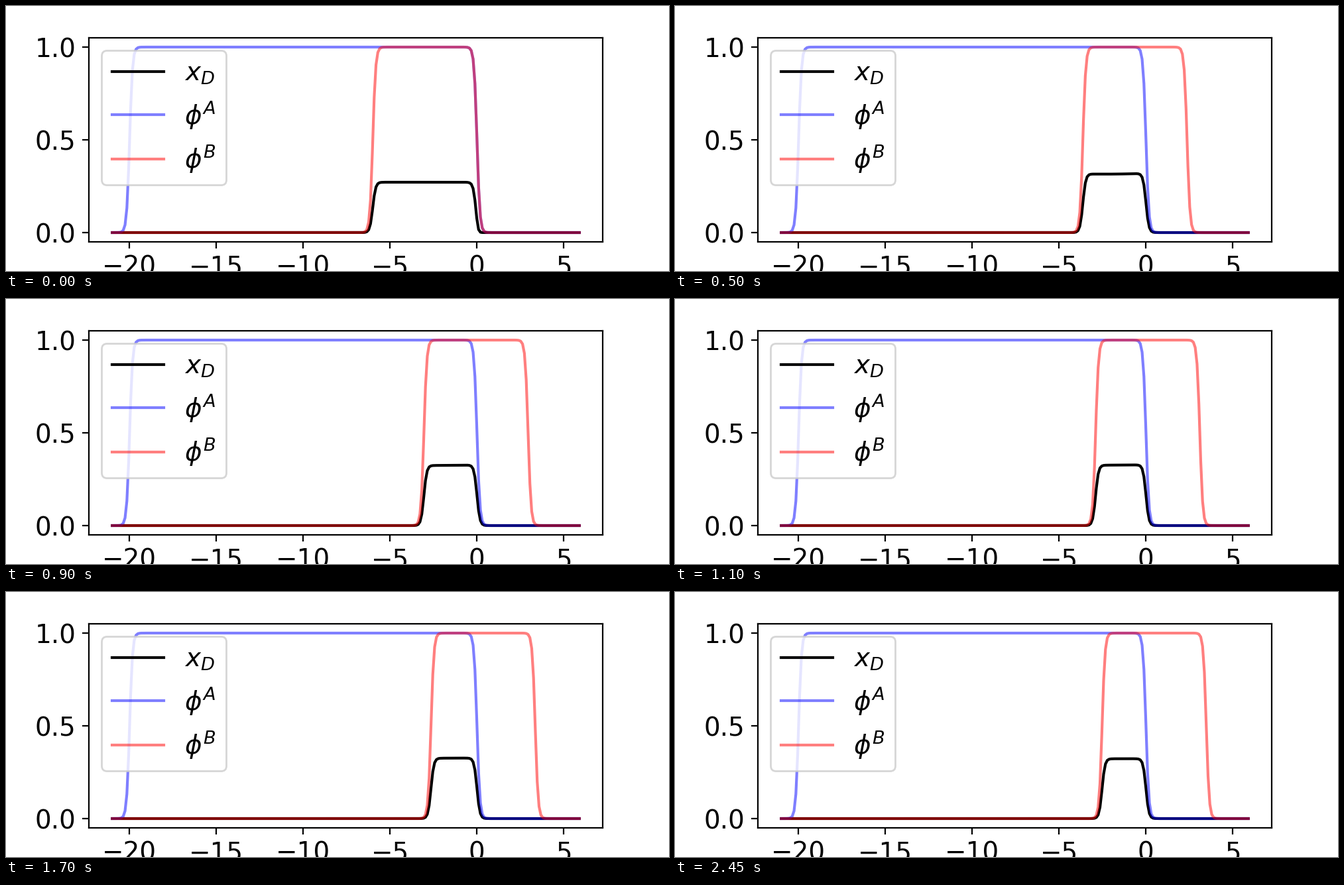
A matplotlib script for the animation above (2500 ms loop, 1000 by 400 pixels).

```python
import matplotlib.pyplot as plt
import numpy as np
from matplotlib.animation import FuncAnimation

FRAMES, INTERVAL = 50, 50
X_MIN, X_MAX, CELLS = -21, 6, 256
STEEPNESS = 6
LENGTH_A, LENGTH_B = 20, 6

plt.rcParams.update({"font.family": "DejaVu Sans", "font.size": 14})

x = np.linspace(X_MIN, X_MAX, CELLS, endpoint=False)


def filament(left, right):
    """Smooth indicator of the interval from left to right."""
    return 0.5 * (np.tanh(STEEPNESS * (x - left)) - np.tanh(STEEPNESS * (x - right)))


def shift(n):
    """Distance filament B has slid: a fast and a slow relaxation."""
    return 1.87 * (1 - np.exp(-0.068 * n)) + 1.67 * (1 - np.exp(-0.2 * n))


def density(n, left):
    """Crosslinker level across the overlap, with a passing tilt and dip."""
    u = np.clip(1 - 2 * x / left, -1, 1)
    level = 0.335 - 0.00025 * n - 0.0635 * np.exp(-0.137 * n)
    tilt = 0.00045 * n * np.exp(-n / 10)
    dip = 0.0008 * n**2 * np.exp(-n / 3)
    return level + tilt * u + dip * (u**2 - 1 / 3)


phi_a = filament(-LENGTH_A, 0)


def profiles(n):
    left = shift(n) - LENGTH_B
    phi_b = filament(left, left + LENGTH_B)
    return density(n, left) * phi_a * phi_b, phi_b


fig, ax = plt.subplots(figsize=(5, 2), dpi=200)
x_d, phi_b = profiles(0)
line_d, = ax.plot(x, x_d, color="black", label=r"$x_D$")
ax.plot(x, phi_a, color="blue", alpha=0.5, label=r"$\phi^A$")
line_b, = ax.plot(x, phi_b, color="red", alpha=0.5, label=r"$\phi^B$")

margin = 0.05 * (x[-1] - x[0])
ax.set_xlim(x[0] - margin, x[-1] + margin)
ax.set_ylim(-0.05, 1.05)
ax.set_xticks(range(-20, 6, 5))
ax.set_yticks([0, 0.5, 1])
ax.legend(loc="upper left")


def update(n):
    x_d, phi_b = profiles(n)
    line_d.set_ydata(x_d)
    line_b.set_ydata(phi_b)
    return line_d, line_b


anim = FuncAnimation(fig, update, frames=FRAMES, interval=INTERVAL,
                     repeat=True, repeat_delay=0)
plt.show()
```
